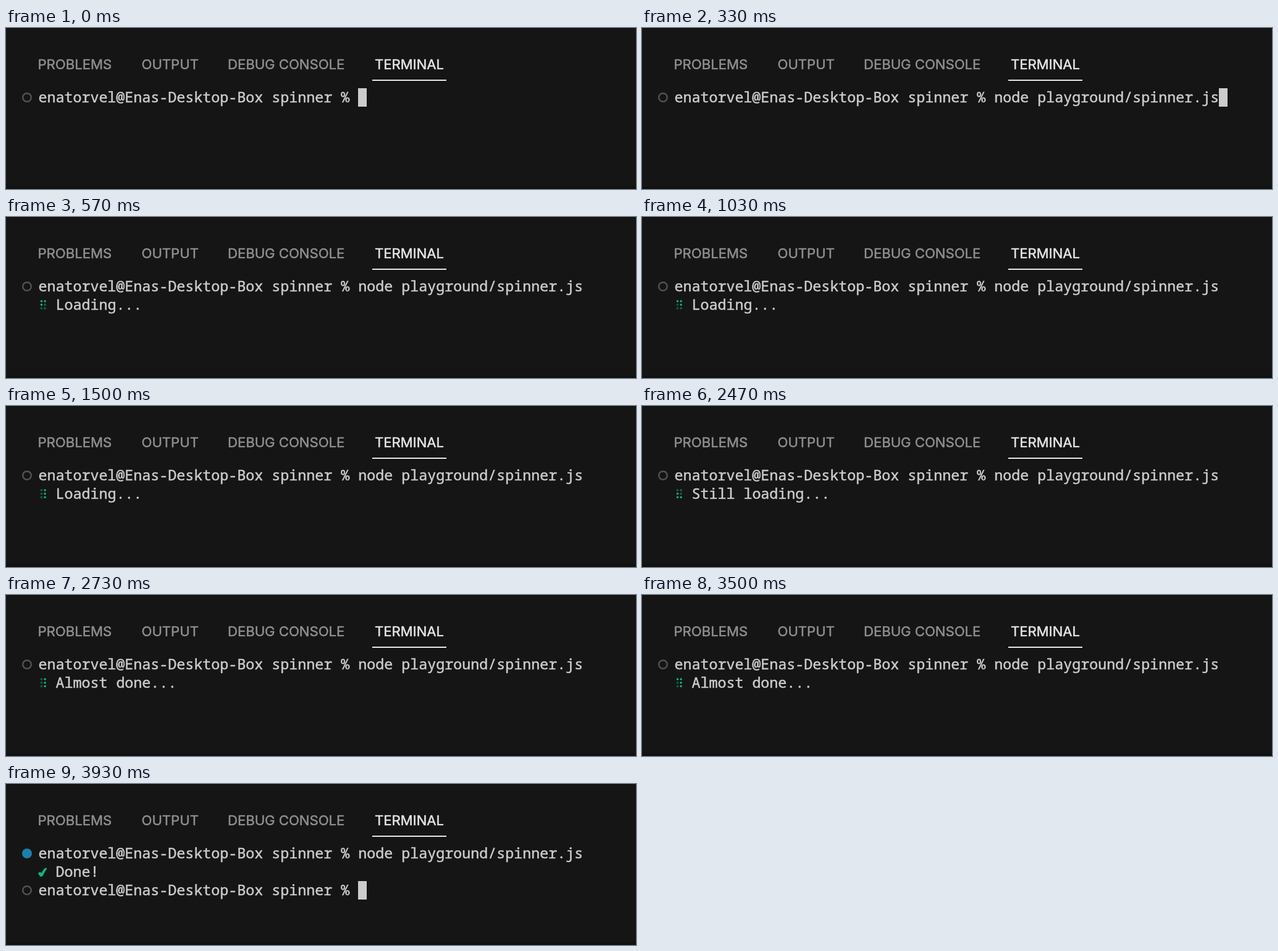
Animation, 1020 px wide and 262 px high, one loop 4.07 s. Source, as an HTML page with a canvas:

```html
<!DOCTYPE html>
<html lang="en">
<head>
<meta charset="utf-8">
<title>Terminal spinner</title>
<style>
  html, body { margin: 0; width: 100%; height: 100%; overflow: hidden; background: #151515; }
  canvas { display: block; }
</style>
</head>
<body>
<canvas id="stage" width="1020" height="262"></canvas>
<script>
const ctx = document.getElementById('stage').getContext('2d');

const LOOP = 4070;
const TICK = 1000 / 30;
const CELL = 14, ROW = 30, LEFT = 52, TOP = 98;
const TEXT = '#cccccc', GREEN = '#0dbc79', BLUE = '#1b81a8', RING = '#525252';
const MONO = '23.333px "Noto Sans Mono", "DejaVu Sans Mono", monospace';
const SANS = '22.1px Inter, Roboto, sans-serif';

const PROMPT = 'enatorvel@Enas-Desktop-Box spinner % ';
const COMMAND = 'node playground/spinner.js';
const TABS = [['PROBLEMS', 51.5], ['OUTPUT', 219.5], ['DEBUG CONSOLE', 359], ['TERMINAL', 597]];
const SPINNER = [...'⠋⠙⠹⠸⠼⠴⠦⠧⠇⠏'];

// Moments in ms
const TYPE_WORD = 165, TYPE_ALL = 328, ENTER = 465;
const SPIN = 558, STEP = 40.85, STILL = 1560, ALMOST = 2562, DONE = 3564, EXIT = 3595;

function rect(x, y, w, h, color) {
  ctx.fillStyle = color;
  ctx.fillRect(x, y, w, h);
}

// A thin outline gives the text its slightly heavier weight
function label(text, x, y, font, color) {
  ctx.font = font;
  ctx.fillStyle = ctx.strokeStyle = color;
  ctx.lineWidth = 0.5;
  ctx.lineJoin = 'round';
  ctx.fillText(text, x, y);
  ctx.strokeText(text, x, y);
}

function write(text, col, row) {
  label(text, LEFT + col * CELL + 0.4, TOP + row * ROW + 23, MONO, TEXT);
}

function cursor(col, row) {
  rect(LEFT + col * CELL, TOP + row * ROW, CELL, ROW, TEXT);
}

function disc(x, y, r, color) {
  ctx.beginPath();
  ctx.arc(x, y, r, 0, 2 * Math.PI);
  ctx.fillStyle = color;
  ctx.fill();
}

function ring(x, y, r, width, color) {
  ctx.beginPath();
  ctx.arc(x, y, r, 0, 2 * Math.PI);
  ctx.strokeStyle = color;
  ctx.lineWidth = width;
  ctx.stroke();
}

function marker(row, finished) {
  const y = TOP + row * ROW + 15;
  if (finished) disc(34, y, 8, BLUE);
  else ring(34, y, 6.8, 2.4, RING);
}

// Braille cell: the low six bits hold the left column, then the right one
function braille(char) {
  const bits = char.codePointAt(0) - 0x2800;
  for (let i = 0; i < 6; i++) {
    const x = 57.5 + Math.floor(i / 3) * 5.6;
    const y = 137 + (i % 3) * 5.8;
    if (bits >> i & 1) disc(x, y, 1.75, GREEN);
    else ring(x, y, 1.3, 0.7, GREEN);
  }
}

function check() {
  ctx.beginPath();
  ctx.moveTo(52, 145.6);
  ctx.quadraticCurveTo(55.4, 141.4, 57.4, 145);
  ctx.quadraticCurveTo(60.4, 139, 63.6, 136.8);
  ctx.quadraticCurveTo(66, 136.2, 66.4, 137.4);
  ctx.quadraticCurveTo(62.4, 143, 59.6, 149.2);
  ctx.quadraticCurveTo(57, 152, 54.8, 150);
  ctx.closePath();
  ctx.fillStyle = GREEN;
  ctx.fill();
}

function panel() {
  rect(0, 0, 1020, 262, '#151515');
  rect(0, 0, 1020, 1, '#0e0e0e');
  rect(0, 258, 1020, 4, '#121112');
  for (const [name, x] of TABS) {
    label(name, x, 67, SANS, name === 'TERMINAL' ? '#e7e7e7' : '#909090');
  }
  rect(593, 84, 120, 2, '#e7e7e7');
}

function draw(t) {
  panel();
  marker(0, t >= EXIT);

  const typed = t < TYPE_WORD ? 0 : t < TYPE_ALL ? 5 : COMMAND.length;
  write(PROMPT + COMMAND.slice(0, typed), 0, 0);

  if (t < ENTER) {
    cursor(PROMPT.length + typed, 0);
  } else if (t < SPIN) {
    cursor(0, 1);
  } else if (t < DONE) {
    braille(SPINNER[Math.floor((t - SPIN) / STEP) % SPINNER.length]);
    write(t < STILL ? 'Loading...' : t < ALMOST ? 'Still loading...' : 'Almost done...', 2, 1);
  } else {
    check();
    write('Done!', 2, 1);
    if (t < EXIT) {
      cursor(0, 2);
    } else {
      marker(2, false);
      write(PROMPT, 0, 2);
      cursor(PROMPT.length, 2);
    }
  }
}

const start = performance.now();

function frame() {
  const t = (performance.now() - start) % LOOP;
  // The screen updates at 30 frames per second
  draw(Math.floor((t + 4) / TICK) * TICK);
  requestAnimationFrame(frame);
}

frame();
</script>
</body>
</html>
```
